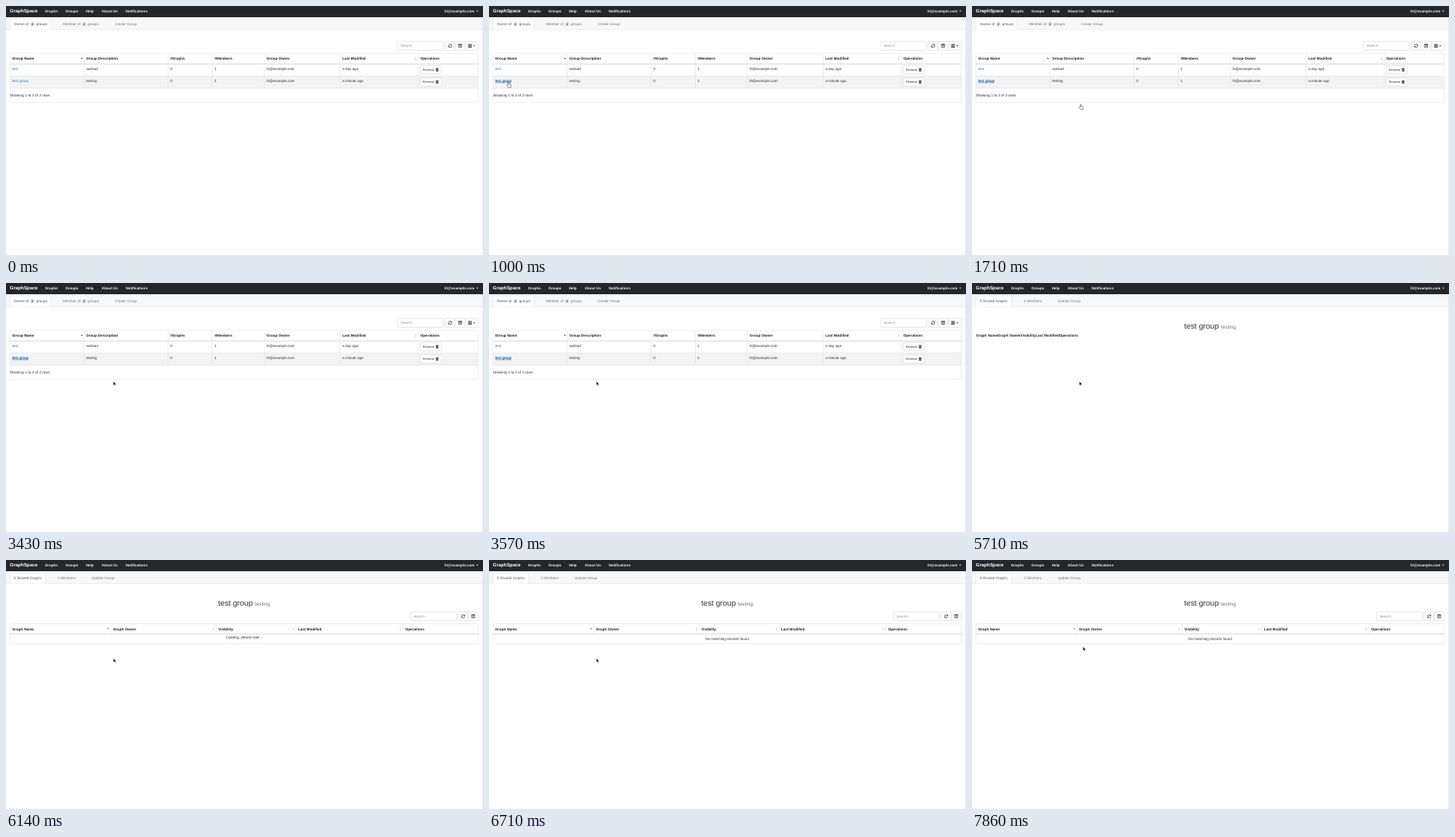
An HTML page that plays this animation: 596 px wide and 311 px high, repeating every 8 s.

```html
<!DOCTYPE html>
<html lang="en">
<head>
<meta charset="utf-8">
<title>Groups</title>
<style>
html, body { margin: 0; width: 100%; height: 100%; overflow: hidden; background: #fefefe; }
svg { display: block; }
text { font: 4.55px "Liberation Sans", Arial, sans-serif; fill: #333; text-rendering: geometricPrecision; white-space: pre; }
.b { font-weight: bold; fill: #222; }
.nav { font-weight: bold; fill: #eee; }
.brand { font-weight: bold; font-size: 5.9px; fill: #fff; }
.tab { fill: #777; }
.on { fill: #555; }
.link { fill: #2b7cba; }
.hint { fill: #999; }
.small { font-size: 3.9px; }
.badge { font-size: 3.7px; font-weight: bold; fill: #444; text-anchor: middle; }
.title { font-size: 9.75px; }
.sub { font-size: 6.4px; fill: #777; }
.mid { text-anchor: middle; }
</style>
</head>
<body>
<svg id="stage" width="596" height="311" viewBox="0 0 596 311"></svg>
<script>
const LOOP = 8000;
const EMAIL = 'lit@example.com';

const text = (x, y, s, cls = '') => `<text x="${x}" y="${y}" class="${cls}">${s}</text>`;
const rect = (x, y, w, h, fill, stroke = 'none', r = 0) =>
  `<rect x="${x}" y="${y}" width="${w}" height="${h}" rx="${r}" fill="${fill}" stroke="${stroke}" stroke-width=".5"/>`;
const path = (d, stroke, width = .5, fill = 'none') =>
  `<path d="${d}" fill="${fill}" stroke="${stroke}" stroke-width="${width}"/>`;
const line = (x1, y1, x2, y2, color = '#ddd', width = .5) => path(`M${x1} ${y1}L${x2} ${y2}`, color, width);
const group = (id, body) => `<g id="${id}">${body}</g>`;
const at = (x, y, body) => `<g transform="translate(${x} ${y})">${body}</g>`;

const caret = (x, y) => path(`M${x - 1.3} ${y}h2.6l-1.3 1.4z`, 'none', 0, 'currentColor');
const sortUp = (x, y) => path(`M${x - 1.2} ${y}h2.4l-1.2 -1.4z`, 'none', 0, '#333');
const sortBoth = (x, y) =>
  path(`M${x - 1} ${y - .5}h2l-1 -1.3zM${x - 1} ${y + .5}h2l-1 1.3z`, 'none', 0, '#bbb');

const refreshIcon = (x, y) => at(x, y,
  path('M-2 -.3A2 2 0 0 1 1.5 -1.3M2 .3A2 2 0 0 1 -1.5 1.3', '#333', .8) +
  path('M2.3 -2.3v2h-2zM-2.3 2.3v-2h2z', 'none', 0, '#333'));
const listIcon = (x, y) => at(x, y,
  rect(-2.1, -2.1, 4.2, 4.2, '#fff', '#333', .2) +
  line(-2.1, -1.6, 2.1, -1.6, '#333', 1) +
  [-.3, .6, 1.5].map(v => line(-1.5, v, 1.5, v, '#444', .45)).join(''));
const gridIcon = (x, y) => at(x, y,
  [-1.6, 0, 1.6].map(v => path(`M-2.3 ${v}h1.3m.3 0h1.3m.3 0h1.3`, '#333', 1.2)).join(''));
const trashIcon = (x, y) => at(x, y,
  path('M-1.3 -1h2.6v3h-2.6z', '#333', .5, '#777') + path('M-1.8 -1.3h3.6M-.6 -1.9h1.2', '#333', .6));

const toolbar = (x, y, buttons) => rect(x, y, 57.5, 11, '#fff', '#ccc', 1.2) +
  text(x + 4, y + 7.1, 'Search', 'hint') +
  buttons.map(([left, width]) => rect(left, y, width, 11, '#fff', '#ccc', 1)).join('');

const removeButton = y => rect(517.4, y, 26.6, 10.2, '#fff', '#ccc', 1) +
  text(520.8, y + 6.5, 'Remove', 'small') + trashIcon(538.7, y + 5);

const badge = x => rect(x - 2.8, 20.1, 5.6, 5.2, '#ddd', 'none', 2.4) + text(x, 24, '2', 'badge');

const activeTab = right =>
  path(`M5 29.4V17.2q0 -1.2 1.2 -1.2H${right - 1.2}q1.2 0 1.2 1.2V29.4`, '#ddd', .5, '#fefefe');

const shell = rect(0, 0, 596, 311, '#fefefe') + rect(0, 14, 595.5, 15.3, '#f8f8f8') +
  line(0, 29.4, 595.5, 29.4) + line(595.5, 14, 595.5, 311, '#ddd', .6) +
  rect(0, 0, 596, 14, '#24272a') + text(4.8, 8.2, 'GraphSpace', 'brand') +
  [[48.8, 'Graphs'], [74.2, 'Groups'], [99.8, 'Help'], [119.6, 'About Us'], [149.4, 'Notifications']]
    .map(([x, s]) => text(x, 7.9, s, 'nav')).join('') +
  text(548, 7.9, EMAIL, 'nav') + `<g color="#eee">${caret(588.8, 5.8)}</g>`;

const columns = [5, 97.4, 202.4, 257.6, 322.8, 417.4, 515];
const cells = (labels, y, cls, edges = columns) =>
  labels.map((s, i) => text(edges[i] + 2.8, y, s, cls)).join('');

const listPage = activeTab(56.2) +
  text(9.8, 24, 'Owner of', 'tab on') + badge(33) + text(37.8, 24, 'groups', 'tab on') +
  text(71.2, 24, 'Member of', 'tab') + badge(97.6) + text(102, 24, 'groups', 'tab') +
  text(136, 24, 'Create Group', 'tab') +
  toolbar(489, 44.3, [[548.8, 12.2], [561, 12.5], [573.5, 16.6]]) +
  refreshIcon(554.9, 49.8) + listIcon(567.4, 49.8) + gridIcon(579.7, 49.8) +
  `<g color="#333">${caret(585, 49.3)}</g>` +
  rect(5, 87.4, 585, 15.3, '#f3f3f3') + rect(5, 59.2, 585, 61.2, 'none', '#ddd', 1) +
  line(5, 72.4, 590, 72.4, '#ccc', .7) + line(5, 87.4, 590, 87.4) + line(5, 102.7, 590, 102.7) +
  columns.slice(1).map(x => line(x, 59.2, x, 102.7)).join('') +
  cells(['Group Name', 'Group Description', '#Graphs', '#Members', 'Group Owner', 'Last Modified', 'Operations'], 67.2, 'b') +
  sortUp(94.8, 66) + sortBoth(511.7, 65.9) +
  text(7.8, 79.7, 'test', 'link') + cells(['', 'asdsad', '0', '1', EMAIL, 'a day ago'], 79.7) +
  text(7.8, 95, 'test group', 'link') + cells(['', 'testing', '0', '1', EMAIL, 'a minute ago'], 95) +
  removeButton(74.5) + removeButton(89.8) +
  text(5, 113.1, 'Showing 1 to 2 of 2 rows') +
  group('hover', text(7.8, 95, 'test group', 'link') + line(7.8, 95.8, 28, 95.8, '#23527c', .5));

const groupPage = activeTab(49.6) +
  text(9.8, 24, '0 Shared Graphs', 'tab on') + text(64.4, 24, '1 Members', 'tab') +
  text(107, 24, 'Update Group', 'tab') +
  text(265, 56.7, 'test group', 'title') + text(311, 56.7, 'testing', 'sub');

const graphColumns = [5, 131, 262.4, 362.2, 496];
const graphHeads = ['Graph Name', 'Graph Owner', 'Visibility', 'Last Modified', 'Operations'];
const graphTable = toolbar(505.3, 64.8, [[565, 12.3], [577.3, 12.7]]) +
  refreshIcon(571.2, 70.3) + listIcon(583.8, 70.3) +
  rect(5, 79.6, 585, 24.9, 'none', '#ddd', 1) + line(5, 92.4, 590, 92.4, '#ccc', .7) +
  graphColumns.slice(1).map(x => line(x, 79.6, x, 92.4)).join('') +
  cells(graphHeads, 87.7, 'b', graphColumns) +
  sortUp(127.8, 86.3) + [259.2, 359, 492.6].map(x => sortBoth(x, 86.2)).join('');

const arrow = path('M0 0V4.9L1.1 3.9L1.9 5.6L2.8 5.2L2 3.6H3.5Z', '#fff', .4, '#000');
const hand = path('M1.5 3.6V.8q0 -.7 .6 -.7t.6 .7V2.6l2 .5q.8 .2 .7 1l-.4 1.8V6.8H2.1L.3 4.3q-.3 -.6 .2 -.8t1 .6', '#222', .5, '#fff');

const stage = document.getElementById('stage');
stage.innerHTML = shell + group('list', listPage) + group('detail', groupPage) +
  group('plain', text(5, 66.6, graphHeads.join(''), 'b')) + group('table', graphTable) +
  group('loading', text(297.5, 97.7, 'Loading, please wait...', 'mid')) +
  group('empty', text(297.5, 100.2, 'No matching records found', 'mid')) +
  group('hand', hand) + group('arrow', arrow);

const parts = Object.fromEntries([...stage.querySelectorAll('g[id]')].map(g => [g.id, g]));

// Visibility windows in ms: [from, to)
const windows = {
  list: [0, 4570], hover: [290, 4570], detail: [4570, LOOP], plain: [4570, 6140],
  table: [6140, LOOP], loading: [6140, 6290], empty: [6290, LOOP],
  hand: [860, 3430], arrow: [3430, LOOP]
};

// The pointer jumps between these positions: [time, x, y]
const pointer = [[0, 22.2, 95], [1570, 110, 117], [1710, 133.8, 122.6], [3430, 134.2, 122.8], [7860, 138.7, 108.3]];

function draw(t) {
  for (const [id, [from, to]] of Object.entries(windows)) {
    parts[id].style.display = t >= from && t < to ? '' : 'none';
  }
  const [, x, y] = pointer.findLast(([time]) => time <= t);
  for (const id of ['hand', 'arrow']) parts[id].setAttribute('transform', `translate(${x} ${y})`);
}

const start = performance.now();
function tick() {
  draw((performance.now() - start) % LOOP);
  requestAnimationFrame(tick);
}
tick();
</script>
</body>
</html>
```
